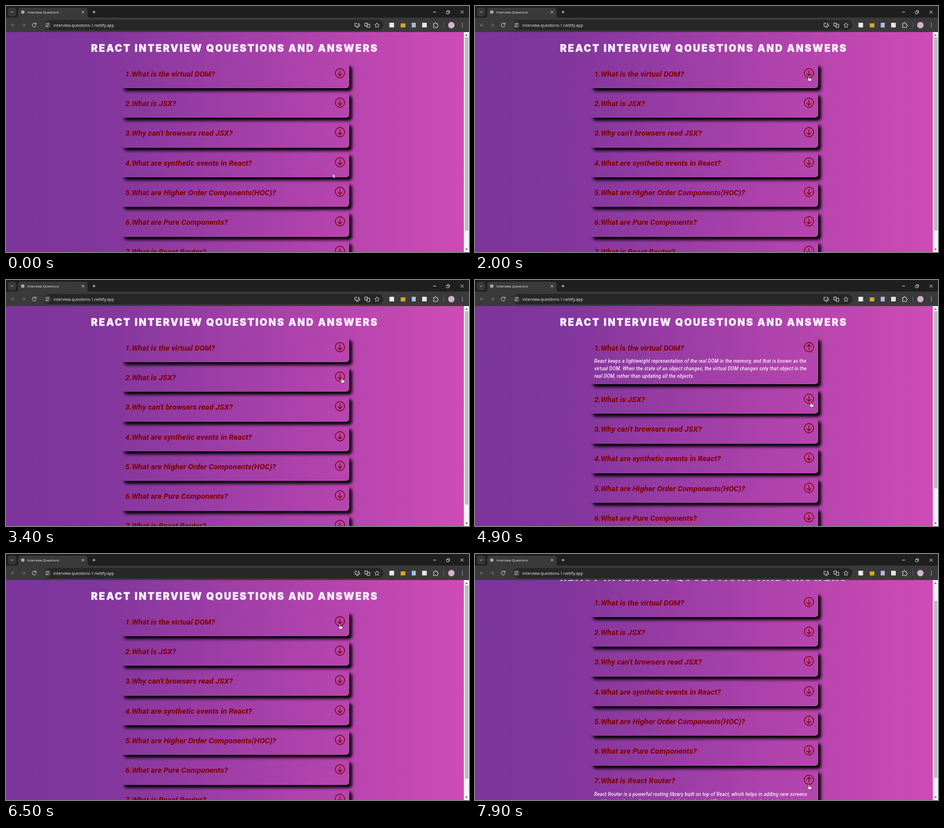
These frames come from a looping animation (800x425 px, 8000 ms). An HTML page:

```html
<!DOCTYPE html>
<html lang="en">
<head>
<meta charset="utf-8">
<title>Interview Questions</title>
<style>
html, body { margin: 0; width: 100%; height: 100%; overflow: hidden; }
#stage { position: relative; width: 800px; height: 425px; overflow: hidden; background: #3b3a3b; }
svg { position: absolute; left: 0; top: 0; overflow: visible; }
#page {
  position: absolute; top: 45px; width: 791px; height: 380px; overflow: hidden;
  background: linear-gradient(90deg, #7c359b, #81369c 20%, #a23fa8 52%, #cf4bb6);
}
#content { position: absolute; width: 100%; }
h1 {
  position: absolute; left: 147px; top: 15.5px; margin: 0; white-space: nowrap; color: #f8f0fc;
  font: 900 16.9px/24px Inter, sans-serif; letter-spacing: 2.25px; -webkit-text-stroke: .4px;
}
#cards { position: absolute; left: 199px; top: 53.7px; }
.card {
  position: relative; width: 394px; height: 43.5px; margin-bottom: 7.8px;
  border-radius: 5px; box-shadow: 5px 5px 5px #000;
}
.card.open { height: 81.3px; }
h2 {
  position: absolute; left: 7px; top: 9px; margin: 0; white-space: nowrap; color: #800000;
  font: italic 700 13.35px/20px Roboto, sans-serif;
}
p {
  position: absolute; left: 7px; top: 35.8px; margin: 0; white-space: pre; color: #f8effb;
  font: italic 500 8.3px/12.6px Roboto, sans-serif; letter-spacing: .17px; display: none;
}
.open p { display: block; }
.icon { left: 369px; top: 8px; fill: none; stroke: #800000; stroke-width: 1.3; }
.open .icon { transform: rotate(180deg); }
#bar { position: absolute; left: 791px; top: 45px; width: 9px; height: 380px; background: #f3f1f3; }
#thumb { position: absolute; left: 1.5px; width: 6.5px; background: #bdbcbd; }
</style>
</head>
<body>
<div id="stage">
  <svg width="800" height="45" font-family="Open Sans, sans-serif" fill="none" stroke="#d8d8d8" stroke-width="1">
    <g stroke="none">
      <path d="M0 0H800V20H0z" fill="#1f1f20"/>
      <rect x="3" y="3" width="15" height="15" rx="4.5" fill="#373738"/>
      <path d="M17 20q4 0 4-4V8q0-5 5-5H136q5 0 5 5v8q0 4 4 4z" fill="#3b3a3b"/>
      <rect x="65" y="24" width="587" height="18" rx="9" fill="#272728"/>
      <circle cx="71.500" cy="33" r="6.500" fill="#3b3a3b"/>
      <circle cx="29" cy="10.500" r="3" fill="#a9a9aa"/>
      <text x="37" y="13" font-size="5.9" fill="#eee">Interview Questions</text>
      <text x="82" y="35.500" font-size="6.9" fill="#eee">interview-questions-1.netlify.app</text>
      <rect x="662.500" y="29" width="8" height="8" fill="#eee"/>
      <rect x="682" y="30" width="8" height="7" fill="#d9a527"/>
      <rect x="701" y="29" width="7" height="8" fill="#a9bbe6"/>
      <rect x="719" y="29" width="8" height="8" fill="#e8e4e0"/>
      <circle cx="769.500" cy="33" r="5.500" fill="#d3b3d0"/>
      <path d="M756 28h1v10h-1z" fill="#5c5b5c"/>
      <g fill="#ddd"><circle cx="788.500" cy="30" r=".8"/><circle cx="788.500" cy="33" r=".8"/><circle cx="788.500" cy="36" r=".8"/></g>
    </g>
    <path d="M8.500 9.500l2 2 2-2M131 8.500l4 4m0-4l-4 4M149.500 10.500h5m-2.500-2.500v5M738 10.500h5M785.500 8l5 5m0-5l-5 5"/>
    <path d="M761 9.500h4v4h-4zM762.500 9.500V8h4v4H765" stroke-width=".8"/>
    <path d="M15 33H9m3-3l-3 3 3 3M27 33h6m-3-3l3 3-3 3" stroke="#777"/>
    <path d="M51.500 31a3.300 3.300 0 1 0 .5 2.500M52 29v2.500h-2.500"/>
    <path d="M68 31h3m2 0h2M68 35h2m2 0h3" stroke-width=".8"/>
    <circle cx="72.500" cy="31" r="1.100" stroke-width=".8"/><circle cx="70.500" cy="35" r="1.100" stroke-width=".8"/>
    <path d="M607 30h-4v5h8v-2M605 37h4M609.500 29v4m-1.500-1.500l1.500 1.500 1.500-1.500"/>
    <path d="M620 29.500h4.500v5H620zM624.500 31.500h4v5.500h-4.500l-1-2.500"/>
    <path d="M641 29l1.200 2.700 2.800.3-2.100 2 .6 3-2.500-1.500-2.500 1.500.6-3-2.100-2 2.800-.3z" stroke-width=".8"/>
    <path d="M738.500 30.500h2q0-2 1.500-2t1.500 2h2v2q1.500 0 1.500 1.300t-1.500 1.300v2h-7v-2.200q1.500 0 1.500-1.200t-1.500-1.200z"/>
  </svg>
  <div id="page">
    <div id="content">
      <h1>REACT INTERVIEW QOUESTIONS AND ANSWERS</h1>
      <div id="cards"></div>
    </div>
  </div>
  <div id="bar">
    <div id="thumb"></div>
    <svg width="9" height="380" fill="#666"><path d="M2.500 6.500l2.200-3 2.200 3zM2.500 374l2.200 3 2.200-3z"/></svg>
  </div>
  <svg id="cursor" width="10" height="12" fill="#fff" stroke="#222" stroke-width=".6">
    <path id="arrow" d="M0 0v7.500l1.800-1.600 1.200 2.700 1.300-.6-1.200-2.600h2.400z"/>
    <path id="hand" d="M-1 .8q0-.8.800-.8t.8.800v2.700l3 .7q1 .3.900 1.300L4 8.800H0L-3 5.500q.2-1 1.200-.5l.8.700z"/>
  </svg>
</div>
<script>
const LOOP = 8000, STEP = 100;
const CLOSED_HEIGHT = 413, ANSWER_HEIGHT = 37.8, VIEW = 380, TRACK = 363;

const questions = [
  ["What is the virtual DOM?", `React keeps a lightweight representation of the real DOM in the memory, and that is known as the
virtual DOM. When the state of an object changes, the virtual DOM changes only that object in the
real DOM, rather than updating all the objects.`],
  ["What is JSX?", `JSX is a shorthand for JavaScript XML. This is a type of file used by React which utilizes the
expressiveness of JavaScript along with HTML like template syntax. This makes the HTML file
really easy to understand.`],
  ["Why can't browsers read JSX?"],
  ["What are synthetic events in React?"],
  ["What are Higher Order Components(HOC)?"],
  ["What are Pure Components?"],
  ["What is React Router?", `React Router is a powerful routing library built on top of React, which helps in adding new screens
and flows to the application very quickly, keeping the URL in sync with data that's being
displayed on the web page.`]
];

// [time, question number]
const clicks = [[1000, 1], [2000, 1], [2500, 1], [3100, 1], [3600, 2], [3900, 2],
  [4400, 1], [5200, 2], [5600, 2], [6500, 1], [7900, 7]];
// [time, x, y]
const pointer = [[0, 564.5, 289.5], [200, 577, 121], [3100, 577, 121], [3400, 580.5, 169],
  [3900, 580.5, 169], [4300, 577, 121], [4600, 577, 121], [4900, 580.5, 211], [5700, 580.5, 211],
  [5800, 577, 121], [6500, 577, 121], [6800, 475, 230], [7500, 475, 230], [7800, 577, 398]];
// [time, offset]
const scrolling = [[6600, 0], [6800, 28.6], [7200, 28.6], [7300, 33]];

const $ = id => document.getElementById(id);

$("cards").innerHTML = questions.map(([title, answer = ""], i) => `
  <div class="card"><h2>${i + 1}.${title}</h2><p>${answer}</p>
  <svg class="icon" width="18" height="18"><circle cx="9" cy="9" r="8"/><path d="M9 4.500v9M5.300 9.800L9 13.500l3.700-3.700"/></svg></div>`).join("");
const cards = [...document.querySelectorAll(".card")];

function sample(keys, t) {
  const next = keys.findIndex(key => key[0] > t);
  if (next < 0) return keys[keys.length - 1].slice(1);
  if (next === 0) return keys[0].slice(1);
  const a = keys[next - 1], b = keys[next];
  const k = (t - a[0]) / (b[0] - a[0]);
  return a.slice(1).map((v, i) => v + (b[i + 1] - v) * k);
}

function draw(now) {
  const t = Math.floor(now % LOOP / STEP) * STEP;

  let openCount = 0;
  cards.forEach((card, i) => {
    const open = clicks.filter(([time, n]) => time <= t && n === i + 1).length % 2 === 1;
    card.classList.toggle("open", open);
    openCount += open;
  });

  const [scroll] = sample(scrolling, t);
  const height = CLOSED_HEIGHT + openCount * ANSWER_HEIGHT;
  $("content").style.top = -scroll + "px";
  $("thumb").style.top = 9 + scroll / height * TRACK + "px";
  $("thumb").style.height = VIEW / height * TRACK + "px";

  const [x, y] = sample(pointer, t);
  const overIcon = x > 576;
  $("cursor").style.transform = `translate(${x}px, ${y}px)`;
  $("hand").style.display = overIcon ? "" : "none";
  $("arrow").style.display = overIcon ? "none" : "";
  requestAnimationFrame(draw);
}
requestAnimationFrame(draw);
</script>
</body>
</html>
```
